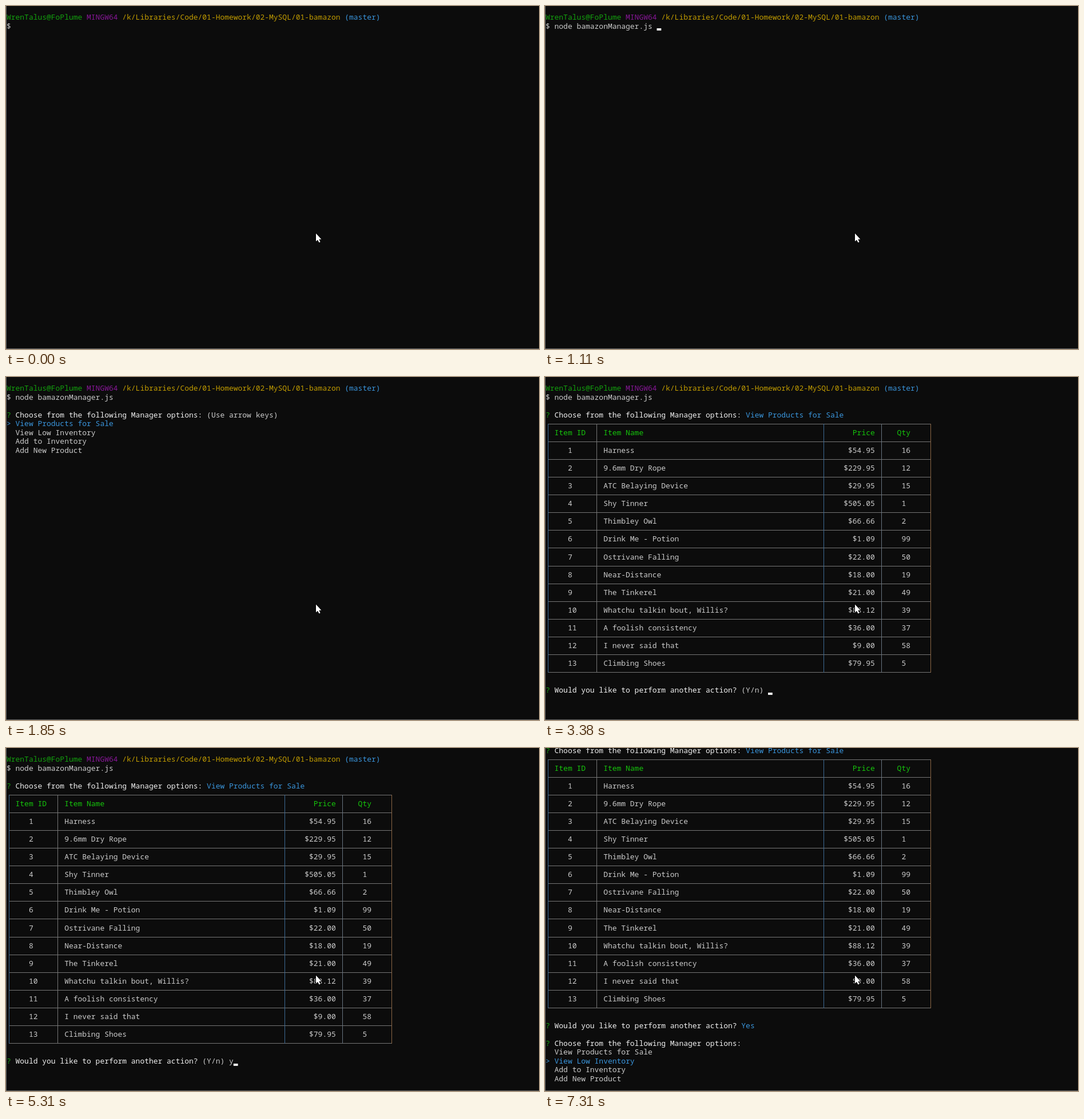
Animation of 932x601 px, one loop 8000 ms. Source, as an HTML page with a canvas:

```html
<!DOCTYPE html>
<html lang="en">
<head>
<meta charset="utf-8">
<title>Store manager terminal</title>
<style>
  html, body { margin: 0; width: 100%; height: 100%; overflow: hidden; background: #0c0c0c; }
  canvas { display: block; }
</style>
</head>
<body>
<canvas id="screen" width="932" height="601"></canvas>
<script>
const ctx = document.getElementById('screen').getContext('2d', { alpha: false });
const LOOP = 8000;
const CELL_W = 7.78, CELL_H = 15.55, LEFT = 1, TOP = 12.3, BASELINE = 11.8;
const BG = '#0c0c0c', GREY = '#767676', WHITE = '#cccccc', BRIGHT = '#f2f2f2';
const GREEN = '#13a10e', LIME = '#16c60c', PURPLE = '#881798', GOLD = '#c19c00', CYAN = '#3a96dd';

const OPTIONS = ['View Products for Sale', 'View Low Inventory', 'Add to Inventory', 'Add New Product'];
const ITEMS = [
  ['Harness', '54.95', 16],
  ['9.6mm Dry Rope', '229.95', 12],
  ['ATC Belaying Device', '29.95', 15],
  ['Shy Tinner', '505.05', 1],
  ['Thimbley Owl', '66.66', 2],
  ['Drink Me - Potion', '1.09', 99],
  ['Ostrivane Falling', '22.00', 50],
  ['Near-Distance', '18.00', 19],
  ['The Tinkerel', '21.00', 49],
  ['Whatchu talkin bout, Willis?', '88.12', 39],
  ['A foolish consistency', '36.00', 37],
  ['I never said that', '9.00', 58],
  ['Climbing Shoes', '79.95', 5],
];
// Column and tint of each vertical table rule
const RULES = [[0, '#3d6a94'], [11, GREY], [62, '#3d6a94'], [75, '#687480'], [86, '#8a6544']];

let scroll = 0;
const colX = col => LEFT + col * CELL_W;
const rowY = row => TOP + (row - scroll) * CELL_H;

function print(row, col, text, color = WHITE) {
  const y = Math.round(rowY(row) + BASELINE);
  ctx.fillStyle = color;
  [...text].forEach((char, i) => ctx.fillText(char, colX(col + i), y));
}

function caret(row, col) {
  const y = Math.round(rowY(row + 1));
  ctx.fillStyle = BRIGHT;
  ctx.fillRect(colX(col), y - 4, CELL_W, 4);
}

function question(row, text, answer, color) {
  print(row, 0, '?', GREEN);
  print(row, 2, text, BRIGHT);
  print(row, text.length + 3, answer, color);
}

function chooser(row, answer, color) {
  question(row, 'Choose from the following Manager options:', answer, color);
}

function menu(row, selected, hint) {
  chooser(row, hint);
  OPTIONS.forEach((label, i) => {
    const active = i === selected;
    if (active) print(row + 1 + i, 0, '>', CYAN);
    print(row + 1 + i, 2, label, active ? CYAN : WHITE);
  });
}

function tableRow(row, id, idCol, name, price, qty, qtyCol, color) {
  print(row, idCol, id, color);
  print(row, 13, name, color);
  print(row, 74 - price.length, price, color);
  print(row, qtyCol, qty, color);
}

function table(row) {
  const centerX = col => Math.round(colX(col + 0.5));
  const centerY = r => Math.floor(rowY(r + 0.5));
  const lastRow = row + 2 * (ITEMS.length + 1);
  ctx.fillStyle = GREY;
  for (let r = row; r <= lastRow; r += 2) {
    ctx.fillRect(centerX(0), centerY(r), centerX(86) - centerX(0) + 1, 1);
  }
  for (const [col, color] of RULES) {
    ctx.fillStyle = color;
    ctx.fillRect(centerX(col), centerY(row), 1, centerY(lastRow) - centerY(row) + 1);
  }
  tableRow(row + 1, 'Item ID', 2, 'Item Name', 'Price', 'Qty', 79, LIME);
  ITEMS.forEach(([name, price, qty], i) =>
    tableRow(row + 3 + 2 * i, `${i + 1}`, 5, name, '$' + price, `${qty}`, 80, WHITE));
}

function pointer() {
  const arrow = new Path2D('M542 398.5V412.5L545 409.7L547.5 414.5L549.6 413.5L547.4 408.7H551.5Z');
  ctx.lineWidth = 1.6;
  ctx.strokeStyle = '#000';
  ctx.stroke(arrow);
  ctx.fillStyle = '#fff';
  ctx.fill(arrow);
}

function draw(t) {
  const within = (from, to) => t >= from && t < to;
  scroll = t < 5740 ? 0 : 4;
  ctx.fillStyle = BG;
  ctx.fillRect(0, 0, 932, 601);
  ctx.font = `${CELL_W / 0.6}px "Noto Sans Mono", monospace`;

  print(0, 0, 'WrenTalus@FoPlume', GREEN);
  print(0, 18, 'MINGW64', PURPLE);
  print(0, 26, '/k/Libraries/Code/01-Homework/02-MySQL/01-bamazon', GOLD);
  print(0, 76, '(master)', CYAN);
  print(1, 0, '$');
  if (t >= 210) print(1, 2, 'node bamazonManager.js');
  if (within(60, 210)) caret(1, 2);
  if (within(210, 580) || within(1110, 1170)) caret(1, 25);
  if (within(1170, 1670)) caret(2, 0);

  if (within(1850, 3380)) menu(3, 0, '(Use arrow keys)');
  if (t >= 3380) {
    chooser(3, OPTIONS[0], CYAN);
    table(4);
    const done = t >= 5740;
    question(34, 'Would you like to perform another action?', done ? 'Yes' : '(Y/n)', done ? CYAN : WHITE);
    if (within(3380, 3750) || within(4250, 4810)) caret(34, 50);
    if (within(4810, 5740)) print(34, 50, 'y');
    if (within(5310, 5740)) caret(34, 51);
    if (done) menu(36, t < 7310 ? 0 : 1, t < 7310 ? '(Use arrow keys)' : '');
  }

  // Window edges
  ctx.fillStyle = '#666';
  ctx.fillRect(0, 0, 1, 601);
  ctx.fillRect(0, 600, 932, 1);
  pointer();
}

const start = performance.now();
function tick() {
  draw((performance.now() - start) % LOOP);
  requestAnimationFrame(tick);
}
tick();
</script>
</body>
</html>
```
